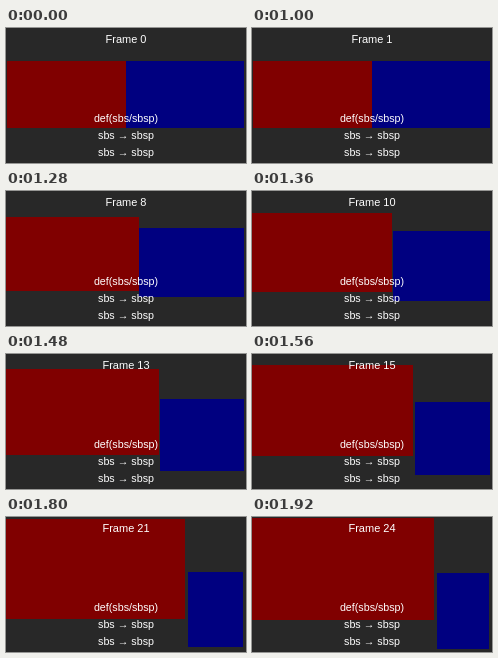
Write an HTML page with a canvas that moves like this. It is 240 px wide and 135 px high and loops after 2920 ms.

```html
<!DOCTYPE html>
<html>
<head>
<meta charset="utf-8">
<style>
  html, body { margin: 0; width: 100%; height: 100%; overflow: hidden; background: #282828; }
  canvas { display: block; }
</style>
</head>
<body>
<canvas id="stage" width="240" height="135"></canvas>
<script>
const ctx = document.getElementById("stage").getContext("2d");
const LOOP = 2920, HOLD = 1000, STEP = 40, LAST = 24;

// Edges as [left, top, right, bottom]
const boxes = [
  { color: "#800000", from: [1, 33, 120, 100], to: [0.9, 1, 182, 103.1] },
  { color: "#000080", from: [120, 33, 238.9, 100], to: [185, 56, 237.9, 132] }
];

const smooth = t => (1 - Math.cos(Math.PI * t)) / 2;

function drawBox({ color, from, to }, progress) {
  const [left, top, right, bottom] =
    from.map((edge, i) => Math.floor(edge + (to[i] - edge) * progress));
  ctx.fillStyle = color;
  ctx.fillRect(left, top, right - left, bottom - top);
}

function drawText(text, baseline, size) {
  ctx.font = `${size}px "Liberation Sans", Arial, sans-serif`;
  ctx.fillStyle = "#fff";
  ctx.fillText(text, 120, baseline);
}

function draw(now) {
  const time = now % LOOP;
  const count = time < HOLD ? 0 : Math.min(LAST, 1 + Math.floor((time - HOLD) / STEP));
  const progress = smooth(Math.max(0, count - 1) / (LAST - 1));

  ctx.fillStyle = "#282828";
  ctx.fillRect(0, 0, 240, 135);
  boxes.forEach(box => drawBox(box, progress));

  ctx.textAlign = "center";
  drawText(`Frame ${count}`, 15, 11);
  drawText("def(sbs/sbsp)", 94, 10.7);
  drawText("sbs → sbsp", 111, 10.7);
  drawText("sbs → sbsp", 128, 10.7);
}

const start = performance.now();
function tick() {
  draw(performance.now() - start);
  requestAnimationFrame(tick);
}
tick();
</script>
</body>
</html>
```
